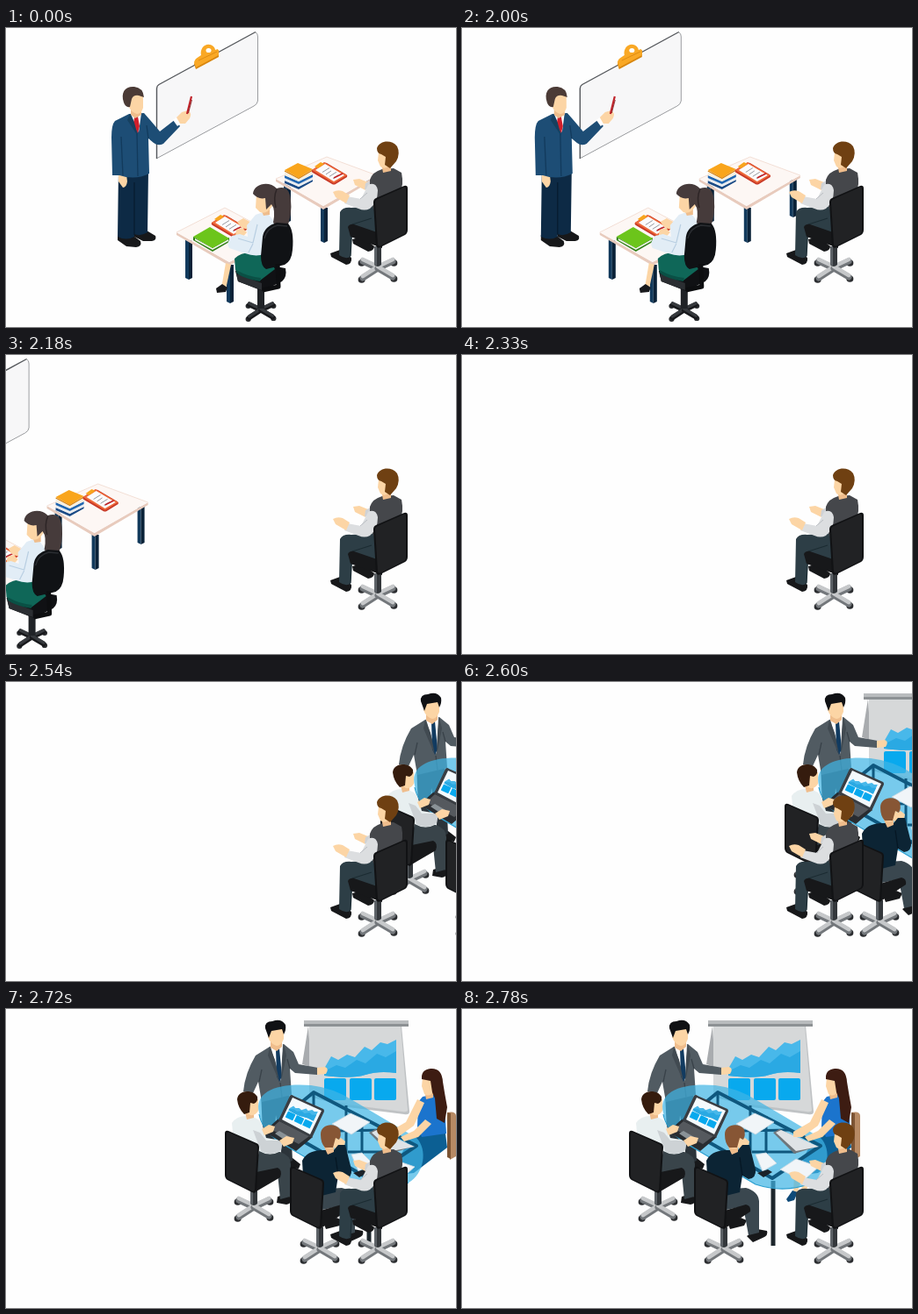
An HTML page with a canvas for the animation above (4780 ms loop, 512 px wide and 341 px high).

```html
<!DOCTYPE html>
<html lang="en">
<head>
<meta charset="utf-8">
<title>Classroom to meeting</title>
<style>
html, body { margin: 0; width: 100%; height: 100%; overflow: hidden; background: #fefefe; }
canvas { display: block; width: 512px; height: 341px; }
</style>
</head>
<body>
<canvas id="stage"></canvas>
<script>
const W = 512, H = 341, LOOP = 4780, STEP = 30;
const canvas = document.getElementById('stage');
const ctx = canvas.getContext('2d');
const ratio = window.devicePixelRatio || 1;
canvas.width = W * ratio;
canvas.height = H * ratio;

const SKIN = '#fcd5a5', SHADE = '#efbd8c', BLACK = '#17181a';

function fill(color, d) {
  ctx.fillStyle = color;
  ctx.fill(new Path2D(d));
}
function line(color, width, d) {
  ctx.strokeStyle = color;
  ctx.lineWidth = width;
  ctx.lineJoin = 'round';
  ctx.stroke(new Path2D(d));
}
function dot(color, x, y, rx, ry = rx) {
  ctx.fillStyle = color;
  ctx.beginPath();
  ctx.ellipse(x, y, rx, ry, 0, 0, 7);
  ctx.fill();
}
function at(x, y, draw, flip = 1) {
  ctx.save();
  ctx.translate(x, y);
  ctx.scale(flip, 1);
  draw();
  ctx.restore();
}

// Office chair parts
function base(x, y, light = '#c6c8ca', dark = '#73777b', size = 1) {
  at(x, y, () => {
    ctx.scale(size, size);
    const feet = [[-17, -8], [17, -8], [-17, 11], [17, 10]];
    for (const [fx, fy] of feet) {
      dot('#2b2d30', fx * 1.08, fy + 3, 4, 3.8);
      ctx.lineCap = 'round';
      line(dark, 7, `M0 1L${fx} ${fy + 1}`);
      line(light, 4.6, `M0-1L${fx} ${fy - 1}`);
      ctx.lineCap = 'butt';
    }
    fill('#34383c', 'M-4-24H4V-3Q0 1-4-3Z');
    fill('#5d6267', 'M-4-24H-1V-2L-4-3Z');
  });
}
function backrest(x, y, flip) {
  at(x, y, () => {
    fill('#111214', 'M0 4Q0 0-4 1L-36 15Q-39 16-39 20L-36 69Q-35 73-31 71L-3 57Q0 55 0 51Z');
    fill('#212224', 'M-2 5Q-2 2-5 3L-34 16Q-37 17-37 20L-34 68Q-33 71-30 69L-4 56Q-2 55-2 51Z');
  }, flip);
}

// Furniture for the lesson
function leg(x, y, h) {
  fill('#123a5c', `M${x} ${y}h4v${h}l-4-2Z`);
  fill('#0a2238', `M${x + 4} ${y}h4v${h - 2}l-4 2Z`);
}
function tableTop(lx, ly, bx, by, rx, ry, fx, fy) {
  fill('#e8cbbd', `M${lx} ${ly}L${fx} ${fy}L${rx} ${ry}v3L${fx} ${fy + 4}L${lx} ${ly + 3}Z`);
  fill('#fdf7f4', `M${lx} ${ly}L${bx} ${by}L${rx} ${ry}L${fx} ${fy}Z`);
  line('#f0d9cd', 0.8, `M${lx} ${ly}L${bx} ${by}L${rx} ${ry}`);
}
function clipboard(x, y) {
  at(x, y, () => {
    fill('#c93a28', 'M0 9Q-1 11 1 12L23 25Q25 26 27 25L40 17Q41 15 39 14L17 1Q15 0 13 1Z');
    fill('#ee6a3a', 'M0 9L14 0L40 15L25 24Z');
    fill('#fbfbfd', 'M4 9L15 2L37 15L25 22Z');
    for (let i = 0; i < 4; i++)
      line('#8d9097', 0.9, `M${12 + i * 4} ${11.5 + i * 2.4}l${8 - i % 2 * 2} ${-5 + i % 2}`);
    fill('#f7a51e', 'M3 5L10 0L14 2L7 7Z');
    line('#c02126', 1.5, 'M25 18L35 13');
  });
}
function books() {
  fill('#1b4b86', 'M317 174L333 181L349 173V175L333 184L317 177Z');
  fill('#e9ecef', 'M317 171L333 178L349 170V173L333 181L317 174Z');
  fill('#2166b0', 'M317 168L333 175L349 167V170L333 178L317 171Z');
  fill('#f6efe0', 'M317 164L333 172L349 163V167L333 175L317 168Z');
  fill('#f9a51c', 'M317 162L332 154L349 161L333 171Z');
  line('#d5800c', 1.2, 'M317 163L333 171.500L349 162');
}

function board() {
  fill('#f7f7f8', 'M171 69Q171 66 174 64L281 5Q286 3 286 9V83Q286 87 282 89L171 149Z');
  line('#9a9c9f', 1, 'M284 5Q286.500 6 286.500 10V83Q286 87 282 89L171 149');
  line('#55585c', 1.4, 'M171.500 149V69Q171.500 66 174 64.500L284 4.500');
  fill('#d8860f', 'M214 41L217 36L242 25L242 33L216 47Z');
  fill('#f9a825', 'M214 39Q215 35 219 33L222 31C220 22 229 15 236 21Q238 23 238 25L241 24Q243 27 242 31L216 45Z');
  dot('#fff', 230.5, 25.5, 3, 2.6);
  line('#d8860f', 0.8, 'M219 37L240 27');
}

function teacher() {
  fill(BLACK, 'M127 236L141 234L153 243Q155 249 148 250L137 249L127 242Z');
  fill(BLACK, 'M146 231L160 231L170 237Q172 242 166 243L156 243L146 238Z');
  fill('#0d2a45', 'M128 164L162 162L161 233Q153 238 146 235V238Q137 243 127 238Z');
  line('#071b2e', 1.2, 'M146 176V236');
  fill(SKIN, 'M128 167L137 167L138 175Q137 182 133 182L128 175Z');
  fill('#1d4d75', 'M124 106L140 98L157 97L164 105L175 118L193 104L198 112L179 132Q173 135 168 131L162 126L163 166Q147 174 129 168L121 168L120 125Q120 110 124 106Z');
  line('#123a5c', 1.3, 'M131 124L133 168M162 126L160 111M149 120L150 169');
  fill('#fff', 'M142 98L154 97L151 119Z');
  fill('#d01f2b', 'M146 102L150 101L152 112L150 120L145 110Z');
  fill('#16405f', 'M141 98L138 105L150 123L146 108Z');
  fill(SHADE, 'M142 92H154V99L147 103L142 99Z');
  fill(SKIN, 'M139 78Q146 71 156 77L156 91Q154 98 149 98Q142 96 139 88Z');
  fill('#4b3b36', 'M134 85C130 73 136 66 146 67Q156 68 157 79L151 77Q145 76 143 81L141 90Q136 91 134 85Z');
  fill('#fff', 'M190 105L194 102L199 109L195 112Z');
  fill(SKIN, 'M194 102L200 96L207 94Q212 97 209 103L204 109L198 109Z');
  line('#c0242b', 2.2, 'M211 78L206 98');
  line('#7b1519', 0.8, 'M211.500 82L207.500 97');
}

function student() {
  fill(SKIN, 'M250 268L256 270L250 298L245 297Z');
  fill('#18191c', 'M239 297L246 292L252 296L250 301L240 302Z');
  base(290, 321, '#36393d', '#17181b', 0.78);
  fill('#202327', 'M286 294H294V320H286Z');
  fill('#101114', 'M261 277L278 267L318 274Q320 284 314 289L292 300L264 289Z');
  fill('#2b2e32', 'M262 280L291 291V299L264 289Z');
  fill('#0f6758', 'M260 263Q270 252 296 258L306 275L289 288Q268 284 261 276Z');
  fill('#0a5045', 'M262 276Q276 284 290 285L289 289Q268 285 262 279Z');
  fill(SKIN, 'M263 221L270 217L281 223L278 231L267 227Z');
  fill(SKIN, 'M262 230L269 228L274 233L268 240L261 237Z');
  fill('#e2edf6', 'M274 225L284 213L296 209L306 222L303 254Q288 263 272 257L254 251Q250 245 257 237L266 235L275 238Z');
  line('#b9cfe2', 1.2, 'M286 224L281 245L264 240M281 246L276 256');
  fill(SHADE, 'M289 204H300V213L293 214Z');
  fill(SKIN, 'M285 189L302 187L303 203Q297 213 289 210L284 205Z');
  fill('#463b3b', 'M281 189C282 177 300 174 308 183Q322 178 324 196Q326 213 319 229Q312 229 304 222Q307 207 302 201L296 207L295 194Q287 196 281 189Z');
  line('#2d2526', 1.5, 'M308 184Q304 193 307 205');
  fill('#101215', 'M292 238Q294 226 308 222L321 223Q328 231 326 253Q325 266 317 270L296 275Q290 272 290 260Z');
  line('#2b2e32', 1.3, 'M294 240Q297 228 309 225L320 226');
  line('#0d0e10', 5, 'M309 269L310 295L292 299');
}

function lesson() {
  board();
  teacher();
  leg(316, 177, 45);
  leg(410, 173, 43);
  leg(358, 205, 40);
  tableTop(307, 172, 365, 147, 422, 168, 361, 203);
  books();
  clipboard(348, 153);
  leg(204, 242, 45);
  leg(251, 270, 44);
  tableTop(194, 233, 249, 205, 311, 238, 254, 267);
  fill('#2f7f17', 'M213 238L234 250L254 239V244L235 255L213 242Z');
  fill('#eff3e6', 'M215 240L235 251L253 241V243L235 253L215 242Z');
  fill('#6cc51b', 'M213 238L232 227L254 240L235 251Z');
  clipboard(234, 213);
  student();
}

// The one person who stays in both scenes
function sitter() {
  fill(BLACK, 'M369 257L380 253L393 262Q394 269 387 270L370 261Z');
  fill(BLACK, 'M394 241L405 238L419 249Q419 254 412 255L395 246Z');
  base(423, 273);
  fill('#2d3e46', 'M380 210Q383 204 393 205L424 203L424 236L394 228L392 261Q386 264 379 259Z');
  line('#1b2b32', 1.2, 'M392 260L394 224L416 217');
  fill(BLACK, 'M389 227Q391 223 396 224L428 235V251L392 238Z');
  fill(SKIN, 'M395 173L402 172L412 176L409 185L397 179Z');
  fill('#cfd2d6', 'M409 177L420 171L421 185L408 184Z');
  fill('#45474b', 'M414 173Q417 164 428 161L441 160L450 165Q453 180 448 188L418 207L414 193Z');
  fill('#dcdee0', 'M412 179Q421 175 423 185Q423 199 414 206Q408 209 401 206L385 200L388 192L404 195Z');
  line('#b9bdc2', 1, 'M403 195L411 188');
  fill(SKIN, 'M372 187Q377 184 383 186L391 191L387 200L375 193Z');
  fill(SHADE, 'M427 154H438V163L429 165Z');
  fill(SKIN, 'M424 142L437 141L436 157Q431 162 426 158L423 151Z');
  fill('#6f4012', 'M422 137C425 128 439 127 445 135Q449 143 444 152L437 160L431 156L432 147L427 144Q422 143 422 137Z');
  backrest(457, 179);
}

// Meeting scene
const AREA = 'M0 33L8 19L16 23L26 17L35 20L46 8L54 12L64 3L72 5L82 0V38Q62 35 47 40T0 41Z';
const PEAKS = 'M0 41V36L14 29L24 32L37 23L47 27L60 16L70 20L82 13V38Q62 35 47 40T0 41Z';
function chart() {
  fill('#48b8ea', AREA);
  fill('#2aa9e3', PEAKS);
  for (const x of [0, 29, 57])
    fill('#08a9ee', `M${x + 2} 44h21q2 0 2 2v21q0 2-2 2h-21q-2 0-2-2v-21q0-2 2-2Z`);
}
function flipchart() {
  fill('#a9acaf', 'M285 19L278 63L288 66Z');
  fill('#bfc2c4', 'M286 19H391L400 117Q400 121 394 120L330 112L286 100Z');
  fill('#d6d8d9', 'M286 19H390L398 115Q398 118 392 117L330 109L286 98Z');
  fill('#8d9194', 'M280 13H399V20H280Z');
  fill('#b9bcbe', 'M280 13H399V17H280Z');
  at(303, 35, chart);
}
function presenter() {
  fill(BLACK, 'M258 172L267 170L276 177L274 182L259 181Z');
  fill('#2c343a', 'M231 94L263 91L267 173L256 177L248 121L246 165H234Z');
  fill(SKIN, 'M212 92L221 92L222 101L216 104Z');
  fill('#515b62', 'M225 53L241 43L257 40L268 49L274 63L296 67L295 75L270 73L264 68L266 98L232 106L228 83L222 96L211 94Q213 73 225 53Z');
  line('#394249', 1.3, 'M229 83L232 69M264 68L261 57M253 84L255 101');
  fill('#fff', 'M242 43L256 40L254 82Z');
  fill('#123b60', 'M248 46L252 45L255 77L252 83L249 77Z');
  fill('#414a51', 'M241 43L239 53L252 83L247 58Z');
  fill('#414a51', 'M257 40L260 53L254 83L255 58Z');
  fill(SHADE, 'M242 37H255V43L249 48L242 44Z');
  fill(SKIN, 'M239 22H257V34Q254 42 249 42Q242 40 239 32Z');
  fill('#101114', 'M236 22Q235 14 244 14Q254 10 259 18Q260 24 257 29L255 23L243 25L240 33Z');
  fill(SKIN, 'M295 67L304 66Q309 68 305 74L295 75Z');
}
function glassTable() {
  line('#1d262c', 5, 'M354 196V270');
  ctx.globalAlpha = 0.7;
  fill('#3fb6e6', 'M229 118C223 94 250 84 288 87Q314 90 337 105L408 147C421 160 417 188 399 198Q368 211 334 200L251 151Q232 137 229 118Z');
  ctx.globalAlpha = 1;
  line('#0f587f', 4, 'M291 95L246 132L353 193L408 156Z');
  line('#0f587f', 3, 'M291 96V118M328 110V164M346 122V166M316 139L372 138M330 163H380');
  line('#2b9fd0', 1.2, 'M229 120Q232 137 251 151L334 200Q368 211 399 198');
}
function sheet(d) {
  fill('#f1f5f8', d);
  line('#c8d8e2', 0.8, d);
}
function laptop() {
  fill('#292c30', 'M250 126L290 146L271 162L235 140Z');
  fill('#55595e', 'M252 128L286 145L274 154L242 137Z');
  fill('#8a9297', 'M247 142L252 139L264 146L259 150Z');
  fill('#3a3e43', 'M264 99Q266 97 268 99L302 114Q304 116 302 119L289 147L251 127Z');
  fill('#f4fafd', 'M267 101L300 116L287 143L255 126Z');
  ctx.save();
  ctx.transform(0.34, 0.16, -0.135, 0.28, 268, 104);
  chart();
  ctx.restore();
}
function woman() {
  fill('#b78a64', 'M443 118Q453 116 453 122V168L446 172Z');
  fill('#7c5434', 'M443 118L447 119V171L443 169Z');
  fill(SKIN, 'M378 186L387 184L382 210L377 211Z');
  fill(SKIN, 'M388 186L396 184L392 210L386 210Z');
  fill('#0f4a78', 'M369 217L376 207L382 209L378 218L371 220Z');
  fill('#0f4a78', 'M381 225L386 207L394 208L391 227L382 229Z');
  fill('#0c5f93', 'M397 153L410 136L440 134L443 158L405 187L379 190Z');
  fill('#1b74cd', 'M410 106L415 100L430 97L440 112L442 142L414 146L409 134Z');
  fill(SHADE, 'M417 92H427V101L419 103Z');
  fill(SKIN, 'M415 78L429 77L427 95Q422 101 417 97L414 88Z');
  fill('#3d1c12', 'M414 80Q413 69 424 68Q437 67 438 83Q440 96 443 112L440 130L431 125L429 102L426 95L424 82Z');
}
function womanArm() {
  fill('#6f767b', 'M354 141L361 137L404 157L378 165Z');
  fill('#dfe3e6', 'M357 141L363 138L406 157L380 162Z');
  fill(SKIN, 'M418 126L425 131L410 146L394 151L390 146L405 139Z');
  fill(SKIN, 'M409 103L417 107L405 133L387 146L377 146L377 140L396 129Z');
}
function typist() {
  fill(BLACK, 'M250 214L260 211L266 216Q266 222 260 223L249 221Z');
  base(223, 225);
  fill('#39444a', 'M219 162Q238 158 253 163Q265 167 265 177L264 214L253 217L250 187L222 190Z');
  fill(BLACK, 'M221 187L250 181Q256 184 253 192L224 209Z');
  fill('#e8eff0', 'M198 130Q204 121 217 122Q230 124 233 133L237 147L255 150L254 162Q241 169 229 162L226 175L200 151Z');
  fill('#cdd2d5', 'M222 138L230 141L237 150L256 150L254 161Q241 169 231 162Z');
  fill(SHADE, 'M212 114H223V124L215 126Z');
  fill(SKIN, 'M211 103H228V116Q225 122 219 121L211 117Z');
  fill('#351c0e', 'M204 103C205 92 222 91 227 100Q228 106 223 108L219 107L218 118L212 120Q205 113 204 103Z');
  backrest(190, 138, -1);
}
function typingHands() {
  fill(SKIN, 'M252 150L260 145L269 147L267 153L257 157Z');
  fill(SKIN, 'M232 137L240 132L247 134L245 140L235 144Z');
}
function listener() {
  fill(BLACK, 'M324 259L336 251L347 253Q349 258 342 261L331 266Z');
  fill(BLACK, 'M302 243L317 238L324 241L321 247L305 251Z');
  base(298, 273);
  fill('#3a474f', 'M292 206L323 204Q337 208 338 219L338 255L326 258L320 225L296 230Z');
  fill(BLACK, 'M295 231L323 223Q329 224 328 231L298 251Z');
  fill(SKIN, 'M314 151L322 147L327 151L325 160L315 162Z');
  fill('#0c2434', 'M278 173Q283 162 299 161L314 161L319 155L327 155L334 183Q335 193 326 194L319 190L316 209L292 215L279 191Z');
  line('#061724', 1.3, 'M316 169L319 190');
  fill(SHADE, 'M302 155H314V163L307 166Z');
  fill(SKIN, 'M302 141L319 140L318 154Q314 161 306 158Z');
  fill('#875635', 'M299 143C299 131 315 129 321 137Q323 144 320 149L316 147L313 158L304 158Q299 153 299 143Z');
  backrest(264, 179, -1);
}
function meeting() {
  flipchart();
  presenter();
  woman();
  glassTable();
  sheet('M312 131L333 119L355 129L334 143Z');
  sheet('M334 166L346 164L358 176L342 185Z');
  sheet('M362 183L380 171L406 180L388 196Z');
  fill('#1b2229', 'M336 187L348 183L353 186L343 192Z');
  womanArm();
  typist();
  laptop();
  typingHands();
  listener();
}

function draw(now) {
  const t = now % LOOP;
  ctx.setTransform(ratio, 0, 0, ratio, 0, 0);
  ctx.fillStyle = '#fefefe';
  ctx.fillRect(0, 0, W, H);
  const out = t < 2000 ? 0 : Math.floor((t - 2000) / STEP) + 1;
  if (out < 12) at(-37.2 * out, 0, lesson);
  if (t >= 2480) {
    const left = Math.max(0, 10 - Math.floor((t - 2480) / STEP));
    at(29.5 * left, 0, meeting);
  }
  sitter();
}
function tick() {
  draw(performance.now());
  requestAnimationFrame(tick);
}
tick();
</script>
</body>
</html>
```
